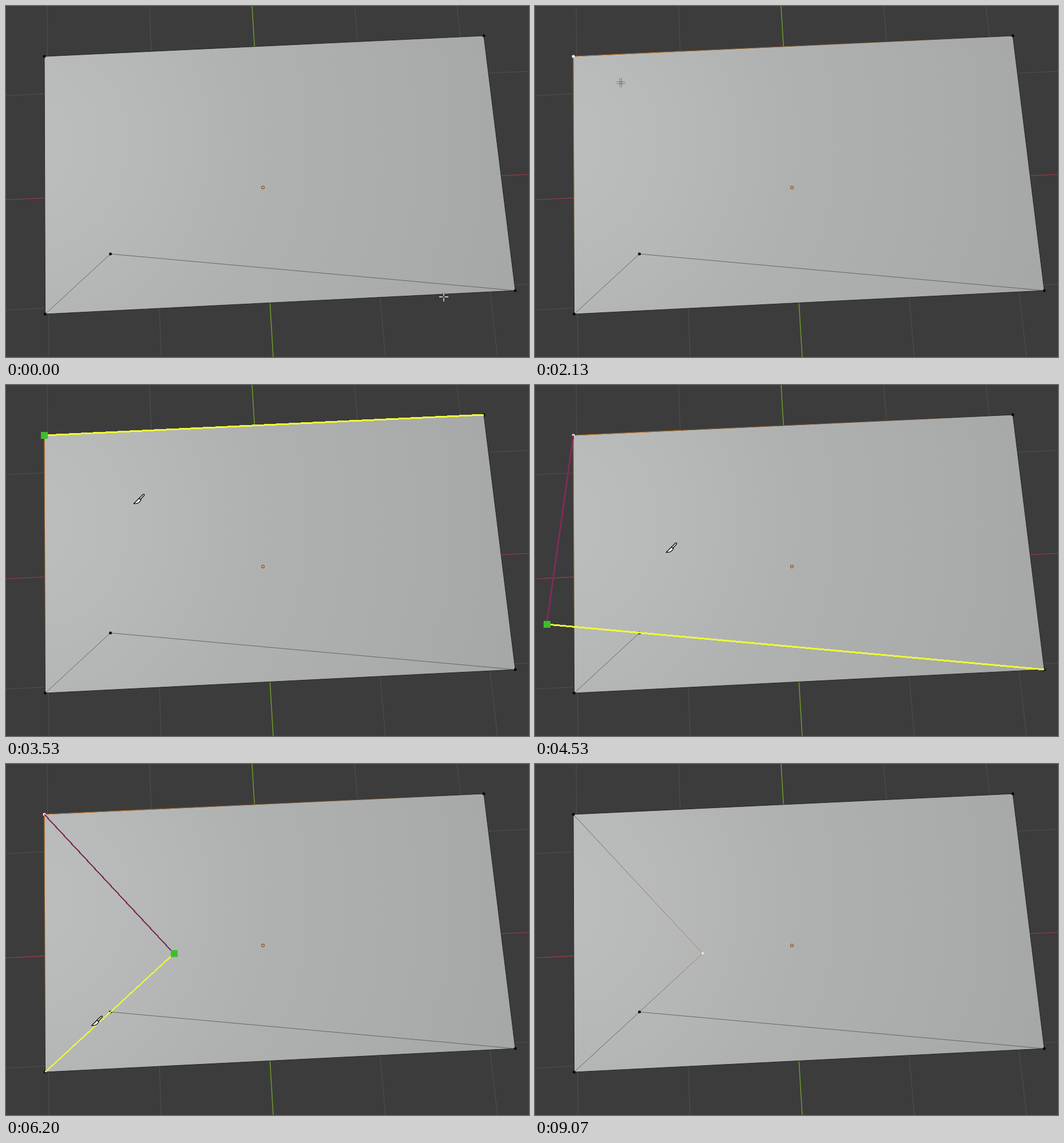
These frames come from a looping animation (914 by 613 pixels, 9870 ms). An HTML page:

```html
<!DOCTYPE html>
<html lang="en">
<head>
<meta charset="utf-8">
<title>Perpendicular knife cut</title>
<style>
  html, body { margin: 0; width: 100%; height: 100%; overflow: hidden; background: #3c3c3c; }
  svg { display: block; width: 914px; height: 613px; }
  .grid { stroke: #505050; }
  .inner { stroke: #5c5e5e; stroke-width: .9; }
  .snap { shape-rendering: crispEdges; }
  .off { display: none; }
</style>
</head>
<body>
<svg viewBox="0 0 914 613" fill="none">
  <defs>
    <radialGradient id="shade" gradientUnits="userSpaceOnUse" cx="20" cy="240" r="880">
      <stop offset="0" stop-color="#bdbfbe"/>
      <stop offset=".25" stop-color="#b7b9b9"/>
      <stop offset=".5" stop-color="#afb1b1"/>
      <stop offset=".75" stop-color="#abacac"/>
      <stop offset="1" stop-color="#a6a8a8"/>
    </radialGradient>
    <g id="fade">
      <stop offset="0" stop-color="#d9842f"/>
    </g>
    <linearGradient id="fadeTop" gradientUnits="userSpaceOnUse" x1="67" y1="88" x2="835" y2="52">
      <stop offset="0" stop-color="#d9822b"/><stop offset="1" stop-color="#d9822b" stop-opacity="0"/>
    </linearGradient>
    <linearGradient id="fadeLeft" gradientUnits="userSpaceOnUse" x1="67" y1="88" x2="68" y2="538">
      <stop offset="0" stop-color="#d9822b"/><stop offset="1" stop-color="#d9822b" stop-opacity="0"/>
    </linearGradient>
    <linearGradient id="fadeCut" gradientUnits="userSpaceOnUse" x1="293" y1="331" x2="67" y2="88">
      <stop offset="0" stop-color="#b97a40"/><stop offset="1" stop-color="#5c5e5e"/>
    </linearGradient>
    <linearGradient id="fadeJoin" gradientUnits="userSpaceOnUse" x1="293" y1="331" x2="182" y2="433">
      <stop offset="0" stop-color="#b97a40"/><stop offset="1" stop-color="#5c5e5e"/>
    </linearGradient>
  </defs>

  <rect width="914" height="613" fill="#3c3c3c"/>
  <path class="grid" d="M72 0 75 613M251 0 271 613M609 0 663 613M788 0 859 613M0 156.5 914 114M0 531 914 485.5"/>
  <path d="M0 338.5 914 294" stroke="#a03c49" stroke-width="1.2"/>
  <path d="M430 0 467 613" stroke="#6f9a2c" stroke-width="1.5"/>

  <path d="M67 88 835 52 890 497 68.5 538Z" fill="url(#shade)" stroke="#252525"/>
  <path class="inner" d="M68.5 538 182.5 433 890 497"/>
  <g id="picked" class="off">
    <path d="M67 88 835 52" stroke="url(#fadeTop)" stroke-width="1.2"/>
    <path d="M67 88 68.5 538" stroke="url(#fadeLeft)" stroke-width="1.2"/>
  </g>
  <g id="cut" class="off" stroke-width=".9">
    <path d="M67 88 293 331" stroke="url(#fadeCut)"/>
    <path d="M293 331 182.5 433" stroke="url(#fadeJoin)"/>
    <circle cx="293" cy="330.5" r="2" fill="#f2f2f2"/>
  </g>

  <g fill="#080808">
    <circle id="corner" cx="67" cy="88" r="2.5"/>
    <circle cx="835" cy="52" r="2.5"/>
    <circle cx="890" cy="497" r="2.5"/>
    <circle cx="68.3" cy="538" r="2.5"/>
    <circle cx="182.5" cy="433" r="2.5"/>
  </g>
  <circle cx="449" cy="317" r="2.6" fill="#f29a58" stroke="#4b3a2c" stroke-width=".9"/>

  <g id="snap" class="snap off">
    <line id="ray" stroke="#7e2b59"/>
    <line id="edge" stroke="#f0fb35"/>
    <rect id="foot" width="12" height="12" fill="#3fbd31"/>
  </g>

  <g id="cross">
    <path d="M-8 0H-1M1 0H8M0-8V-1M0 1V8" stroke="#262626" stroke-width="3"/>
    <path d="M-8 0H-1.5M1.5 0H8M0-8V-1.5M0 1.5V8" stroke="#fff" stroke-width="1.4"/>
  </g>
  <g id="knife" stroke="#0a0a0a" stroke-width="1.3" stroke-linejoin="round" fill="#fff">
    <path d="M.7-.7 10-10 13.5-7Q12-5.5 9.5-2.5 6-.5.7-.7Z"/>
    <path d="M10-10 17.3-17.2 19.3-17.2 18.8-15 12.5-8.2Z"/>
  </g>
</svg>

<script>
const LOOP = 9870, STEP = 200 / 3;
const $ = id => document.getElementById(id);
const show = (id, on) => $(id).classList.toggle('off', !on);

const corner = [67, 88], far = [890, 497], low = [68.5, 538];
// Hovered edge, and the foot of the perpendicular from the corner to it
const hovers = [
  { from: 3530, edge: [corner, [835, 52]], foot: corner },
  { from: 3800, edge: [corner, low], foot: corner },
  { from: 4070, edge: [[20.5, 418], far], foot: [20.5, 418] },
  { from: 5670, edge: [low, [293.5, 331]], foot: [293.5, 331] }
];

// Pointer path: time, x, y; a time alone hides the pointer
const path = [
  [0, 765, 508], [200, 370, 190], [330, 370, 190], [600, 85, 72], [670],
  [1000, 37, 73], [1070, 66, 90], [1800, 66, 90], [2130, 150, 134],
  [2400, 150, 134], [2600, 218, 196], [2730, 74, 95], [2800, 76, 96],
  [3000, 76, 96], [3130, 225, 206], [3470, 225, 206],
  [3530, 222.5, 208], [4130, 228.5, 281], [4470, 228.5, 281],
  [4530, 228.5, 293], [4600, 228.5, 299], [5070, 228.5, 299],
  [6070, 161, 446], [6200, 149, 457.5], [7930, 149, 457.5],
  [8200, 250, 406], [8270, 251, 400], [8930, 106, 605], [9000, 106, 608], [9070]
];

function pointerAt(t) {
  const i = path.findLastIndex(k => k[0] <= t);
  const [t0, x0, y0] = path[i], next = path[i + 1];
  if (x0 === undefined) return null;
  if (!next || next.length < 2) return [x0, y0];
  const u = (t - t0) / (next[0] - t0), e = u * u * (3 - 2 * u);
  return [x0 + (next[1] - x0) * e, y0 + (next[2] - y0) * e];
}

function setLine(id, [x1, y1], [x2, y2]) {
  const dx = Math.abs(x2 - x1), dy = Math.abs(y2 - y1);
  // Three pixels across the minor axis, so diagonals look thinner
  const width = 3 * Math.max(dx, dy) / (Math.hypot(dx, dy) || 1);
  const attrs = { x1, y1, x2, y2, 'stroke-width': width };
  for (const name in attrs) $(id).setAttribute(name, attrs[name]);
}

function draw(now) {
  const tick = Math.floor((now % LOOP + 3.4) / STEP);
  const t = Math.min(Math.round(tick * STEP / 10) * 10, LOOP - 1);
  const cutting = t >= 3530 && t < 7730, selected = t >= 1670 && t < 7730;

  show('picked', selected);
  show('cut', t >= 7730);
  show('snap', cutting);
  $('corner').setAttribute('fill', selected ? '#fff' : '#080808');

  if (cutting) {
    const { edge, foot } = hovers.findLast(h => h.from <= t);
    setLine('edge', ...edge);
    setLine('ray', corner, foot);
    $('foot').setAttribute('x', Math.round(foot[0] - 6));
    $('foot').setAttribute('y', foot[1] - 6);
  }

  const pos = pointerAt(t);
  show('cross', pos && !cutting);
  show('knife', cutting);
  if (pos) $(cutting ? 'knife' : 'cross').setAttribute('transform', `translate(${pos})`);
}

function loop() {
  draw(performance.now());
  requestAnimationFrame(loop);
}
loop();
</script>
</body>
</html>
```
